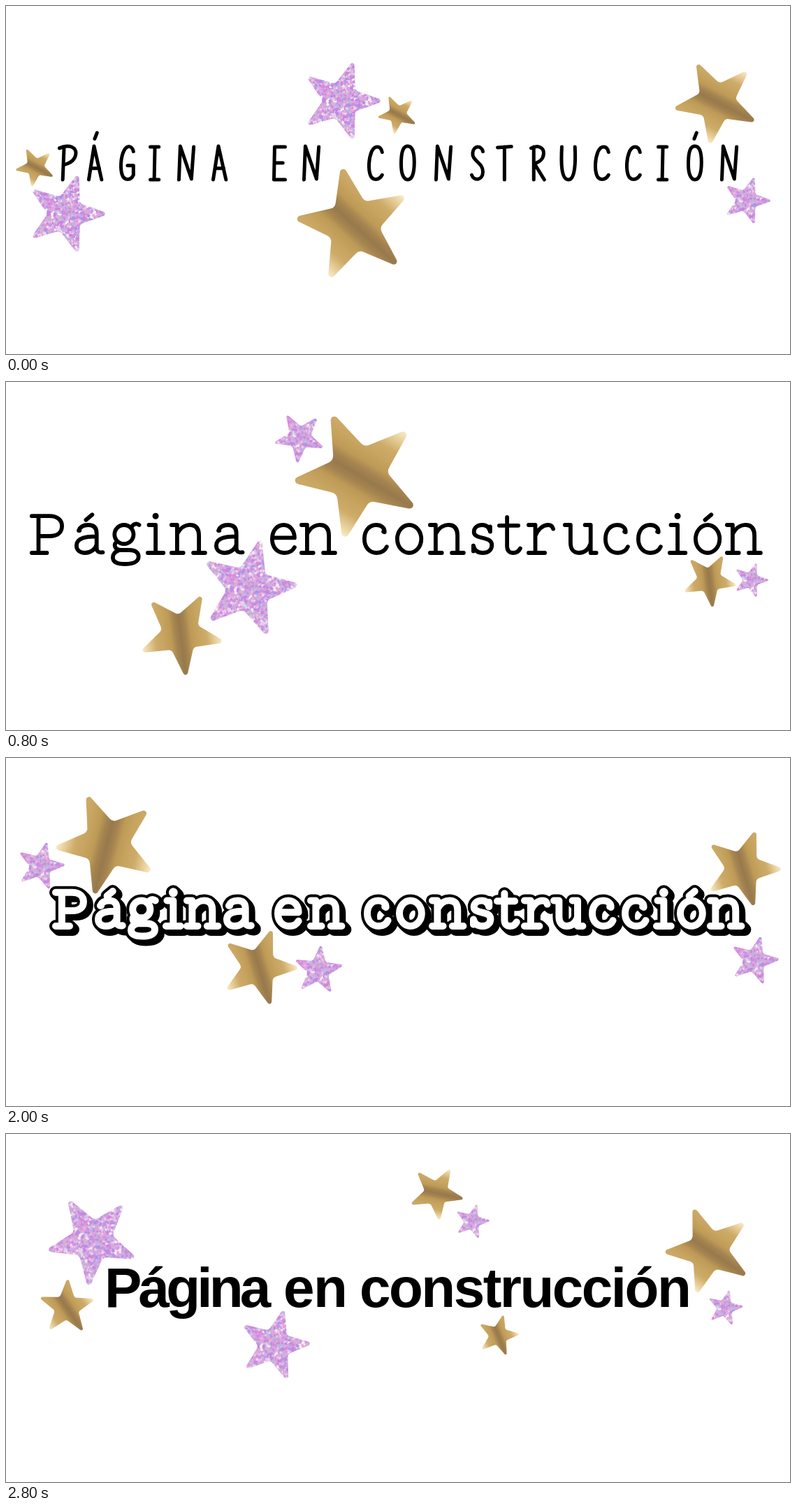
Write an HTML page with a canvas that moves like this. It is 1122 px wide and 499 px high and loops after 3.2 s.

```html
<!DOCTYPE html>
<html lang="es">
<head>
<meta charset="utf-8">
<title>Página en construcción</title>
<style>
html, body { margin: 0; width: 100%; height: 100%; overflow: hidden; background: #fff; }
canvas { display: block; }
</style>
</head>
<body>
<canvas id="stage" width="1122" height="499" role="img" aria-label="Página en construcción"></canvas>
<script>
const ctx = document.getElementById('stage').getContext('2d');
const HOLD = 400;
const PHRASE = 'Página en construcción';
const ACUTE = '\u0301';

// Pen strokes: baseline at 0, cap height 100
const hand = {
  P: 'M14 -96L10 0M0 -94C30 -108 51 -96 50 -78C48 -58 30 -48 12 -44',
  A: 'M0 0L16 -100L39 0M7 -34H32',
  G: 'M38 -84C34 -102 20 -104 10 -88C-2 -66 -2 -30 4 -14C10 2 30 4 38 -14V-42H20',
  I: 'M0 -98H26M14 -98L12 0M0 0H26',
  N: 'M0 0L4 -100L38 -2L45 -98',
  E: 'M34 -98H2L0 0H34M1 -50H27',
  C: 'M40 -82C36 -102 18 -104 8 -84C-2 -60 -2 -30 4 -14C10 2 30 4 40 -14',
  O: 'M18 -100C2 -98 0 -70 0 -46C0 -16 8 0 20 0C34 0 40 -22 40 -52C40 -82 34 -102 18 -100Z',
  S: 'M34 -84C30 -102 6 -104 3 -80C0 -56 34 -52 34 -24C34 4 6 4 0 -14',
  T: 'M0 -96L42 -99M21 -98V0',
  R: 'M8 -98V0M0 -94C24 -106 40 -94 38 -76C36 -58 24 -52 10 -48L40 0',
  U: 'M2 -98C0 -60 -2 0 22 0C44 0 44 -60 42 -98',
  [ACUTE]: 'M18 -122L25 -140'
};

// Pen strokes: baseline at 0, x-height 100
const slab = {
  P: 'M0 -132H64C92 -132 108 -117 108 -96C108 -73 92 -60 64 -60H24M24 -132V0M0 0H54',
  a: 'M8 -80C14 -96 28 -100 42 -100C64 -100 72 -88 72 -70V-18C72 -4 80 0 94 -2' +
     'M72 -58C40 -60 0 -56 0 -26C0 -8 14 0 30 0C52 0 68 -14 72 -30M8 -80h3',
  g: 'M6 -66A34 34 0 1 0 74 -66A34 34 0 1 0 6 -66M16 -42C0 -30 6 -12 28 -10H60' +
     'C84 -10 92 2 92 14C92 34 68 40 44 40C16 40 0 32 0 16C0 2 12 -6 24 -10M66 -90C72 -104 84 -108 94 -100',
  i: 'M4 -100H28V0M0 0H56M24 -132a4 4 0 1 0 8 0a4 4 0 1 0 -8 0',
  n: 'M0 -100H20V0M0 0H42M20 -68C34 -94 54 -102 70 -100C92 -98 98 -82 98 -62V0M78 0H120',
  e: 'M2 -54H80C80 -80 64 -100 41 -100C16 -100 0 -78 0 -50C0 -20 18 0 44 0C62 0 74 -8 80 -20',
  c: 'M72 -74C73 -90 60 -100 42 -100C16 -100 0 -78 0 -50C0 -20 18 0 44 0C62 0 74 -8 80 -22M68 -76h4',
  o: 'M0 -50A43 50 0 1 0 86 -50A43 50 0 1 0 0 -50',
  s: 'M60 -76V-94M60 -76C56 -92 46 -100 32 -100C14 -100 2 -90 2 -75C2 -46 66 -62 66 -28' +
     'C66 -8 50 0 34 0C16 0 4 -8 0 -26M0 -6V-26',
  t: 'M0 -98H68M28 -128V-24C28 -6 38 0 50 0C62 0 70 -6 75 -16',
  r: 'M0 -100H24V0M0 0H58M24 -60C34 -86 52 -100 70 -100C80 -100 86 -94 88 -86',
  u: 'M0 -100H20V-36C20 -12 32 0 50 0C70 0 84 -12 92 -34M72 -100H92V0H112',
  [ACUTE]: 'M34 -118L56 -137'
};

// Block letters: bars as column, row, width, height
const block = {
  P: '0019 1031 4112 1331', A: '0118 4118 1031 1531', G: '1031 0117 1831 4111 4414 3411',
  I: '0019', N: '0019 1031 4118', E: '0117 1031 1421 1831', C: '0117 1031 1831 4111 4711',
  O: '0117 4117 1031 1831', S: '1021 3111 0113 1411 2511 3612 0711 1821', T: '0051 2118',
  R: '0019 1031 4112 1331 3411 4514', U: '0018 4018 1831'
};

function eachLetter(text, xs, draw) {
  [...text.replace(/ /g, '')].forEach((ch, i) => {
    for (const part of ch.normalize('NFD')) draw(part, xs[i]);
  });
}

function penText(font, text, xs, base, sx, sy, penW, penH = penW, colour = '#000') {
  const path = new Path2D();
  eachLetter(text, xs, (ch, x) => path.addPath(new Path2D(font[ch]),
    new DOMMatrix([sx / penW, 0, 0, sy / penH, x / penW + 0.5, base / penH])));
  ctx.save();
  ctx.scale(penW, penH);
  ctx.lineWidth = 1;
  ctx.lineCap = ctx.lineJoin = 'round';
  ctx.strokeStyle = colour;
  ctx.stroke(path);
  ctx.restore();
}

// White letters with a black rim, extruded down and to the right
function raisedText(font, text, xs, base, sx, sy, pen, rim, depth) {
  for (let d = 0; d <= depth; d++) {
    penText(font, text, xs.map(x => x - rim + d), base + d, sx, sy, pen + 2 * rim);
  }
  penText(font, text, xs, base, sx, sy, pen, pen, '#fff');
}

function blockText(text, xs, top, cell) {
  const bar = (x0, c, r, w, h) => {
    const x = Math.round(x0 + c * cell), y = Math.round(top + r * cell);
    ctx.fillRect(x, y, Math.round(x0 + (c + w) * cell) - x, Math.round(top + (r + h) * cell) - y);
  };
  ctx.fillStyle = '#000';
  eachLetter(text, xs, (ch, x) => {
    if (ch === ACUTE) {
      bar(x, 3, -3, 1, 1);
      bar(x, 2, -2, 1, 1);
    } else {
      for (const b of block[ch].split(' ')) bar(x, ...[...b].map(Number));
    }
  });
}

function typeWords(font, xs, base, gaps) {
  ctx.font = font;
  ctx.textAlign = 'left';
  ctx.fillStyle = '#000';
  PHRASE.split(' ').forEach((word, i) => {
    ctx.letterSpacing = gaps[i] + 'px';
    ctx.fillText(word, xs[i], base);
  });
  ctx.letterSpacing = '0px';
}

function centred(font) {
  ctx.font = font;
  ctx.textAlign = 'center';
  ctx.fillStyle = '#000';
  ctx.fillText(PHRASE, 562, 247);
}

function seeded(seed) {
  return () => (seed = seed * 16807 % 2147483647) / 2147483647;
}

function makeGlitter() {
  const size = 160, tile = document.createElement('canvas');
  tile.width = tile.height = size;
  const g = tile.getContext('2d'), rnd = seeded(71);
  const tints = ['#dc86dc', '#c391ee', '#a397e4', '#f3c6e6', '#f8f0f6', '#c884e0', '#e8a2da', '#bcb8d6', '#d6b4da', '#e4d2ee'];
  g.fillStyle = '#d0aae0';
  g.fillRect(0, 0, size, size);
  for (let i = 0; i < 4200; i++) {
    g.fillStyle = tints[Math.floor(rnd() * tints.length)];
    g.beginPath();
    g.ellipse(rnd() * size, rnd() * size, 1.4 + rnd() * 1.4, 1.2 + rnd(), rnd() * 3, 0, 7);
    g.fill();
  }
  return ctx.createPattern(tile, 'repeat');
}
const glitter = makeGlitter();

function starPath(r) {
  const pt = i => {
    const a = i * Math.PI / 5, d = r * (i % 2 ? 0.45 : 1.11);
    return [d * Math.cos(a), d * Math.sin(a)];
  };
  const [ax, ay] = pt(0), [bx, by] = pt(1);
  ctx.beginPath();
  ctx.moveTo((ax + bx) / 2, (ay + by) / 2);
  for (let i = 1; i <= 10; i++) ctx.arcTo(...pt(i), ...pt(i + 1), r * (i % 2 ? 0.12 : 0.057));
  ctx.closePath();
}

// The sheen runs along the tip that points at the given angle
function gold(x, y, r, deg) {
  ctx.save();
  ctx.translate(x, y);
  ctx.rotate(deg * Math.PI / 180);
  const sheen = ctx.createLinearGradient(0, -r, 0, r);
  ['#fff2d4', '#e8cf9a', '#cdab68', '#c7a460', '#bd9a56', '#a58450', '#97794c'].forEach((c, i) => {
    const at = [0, 0.1, 0.2, 0.29, 0.38, 0.44, 0.5][i];
    sheen.addColorStop(at, c);
    sheen.addColorStop(1 - at, c);
  });
  ctx.fillStyle = sheen;
  starPath(r);
  ctx.fill();
  ctx.restore();
}

function pink(x, y, r, deg = 0) {
  ctx.save();
  ctx.translate(x, y);
  ctx.rotate(deg * Math.PI / 180);
  ctx.fillStyle = glitter;
  starPath(r);
  ctx.fill();
  ctx.restore();
}

const scenes = [
  () => {
    gold(1017, 137.5, 60, 27);
    gold(560.5, 155.5, 28, 28);
    gold(42, 231, 28, 28);
    gold(498, 314, 82, 42.5);
    pink(479, 136, 57);
    pink(85, 298, 57);
    pink(1060, 279, 34);
    penText(hand, PHRASE.toUpperCase(),
      [74, 116, 162, 204, 245, 294, 381, 424, 517, 563, 613, 664, 701, 749, 792, 841, 886, 931, 974, 1022],
      249, 0.47, 0.48, 5);
  },
  () => {
    gold(360, 135.5, 69, 30.5);
    pink(453, 87.5, 46);
    gold(1060.5, 147, 47.5, 67);
    gold(74.5, 305, 47, 72);
    pink(153, 300, 34.5);
    pink(804, 349, 70, -4);
    gold(966, 380, 113, 30);
    blockText(PHRASE.toUpperCase(),
      [58, 108, 162, 213, 238, 291, 372, 417, 497, 547, 600, 652, 693, 743, 796, 851, 901, 950, 975, 1030],
      193, 7.15);
  },
  () => {
    pink(420.5, 79.5, 36, 23.5);
    gold(504, 133, 91, 30.5);
    pink(347, 296, 70, -4);
    gold(250, 360.5, 60, 83);
    gold(1006.5, 284, 38.5, 83);
    pink(1066, 284, 25);
    penText(slab, PHRASE,
      [34, 98, 150, 200, 234, 298, 378, 420, 510, 557, 604, 666, 703, 745, 797, 855, 902, 947, 984, 1029],
      245, 0.4, 0.4, 5.8);
  },
  () => {
    gold(119, 115.5, 71, 32);
    pink(219, 140.5, 34.5, -2);
    gold(714, 87, 57, 62.5);
    gold(1014, 311, 90.5, 62.5);
    pink(891.5, 337, 57, -21);
    gold(398.5, 310, 32, 32);
    pink(150, 336, 80.5, -5);
    penText(slab, PHRASE,
      [131, 183, 222, 267, 289, 342, 401, 437, 507, 548, 589, 643, 674, 703, 742, 796, 838, 878, 903, 941],
      247, 0.365, 0.54, 8.6, 3.4);
  },
  () => {
    pink(62, 300, 60);
    gold(300, 107, 67, 30);
    gold(760, 311, 90, 30);
    pink(1040, 130, 40, -4);
    gold(960, 110, 40, 72);
    centred('400 78px "Noto Serif", serif');
  },
  () => {
    gold(144.5, 123.5, 73, 104);
    pink(49.5, 155, 34.5, -3);
    gold(362, 300, 55, 73);
    pink(447, 304.5, 35, -12);
    gold(1054, 158.5, 55, 73);
    pink(1071, 290.5, 35, -3);
    raisedText(slab, PHRASE,
      [66, 127, 174, 224, 254, 311, 384, 431, 512, 558, 605, 664, 698, 737, 779, 834, 881, 926, 960, 1003],
      241, 0.37, 0.365, 10, 4, 5);
  },
  () => {
    gold(49, 150, 47, 72);
    pink(1049, 290, 50);
    gold(430, 314, 80, 30);
    pink(330, 290, 40, -4);
    gold(700, 105, 45, 30);
    centred('400 82px Lato, sans-serif');
  },
  () => {
    pink(124, 152, 64.5, 23);
    gold(87, 248.5, 39.5, 56);
    gold(616, 84.5, 38.5, 12);
    pink(667, 125.5, 25, -3);
    pink(384, 303, 51, -3);
    gold(704.5, 289, 29.5, 68);
    gold(1006, 167, 62.5, 34);
    pink(1029, 249.4, 25.5, -5);
    typeWords('bold 80px "Liberation Sans", Arial, sans-serif', [141, 397, 506], 248, [-4.8, -1.5, -2.5]);
  }
];

let shown = -1;
const start = performance.now();

function tick() {
  const i = Math.floor((performance.now() - start) / HOLD) % scenes.length;
  if (i !== shown) {
    shown = i;
    ctx.fillStyle = '#fff';
    ctx.fillRect(0, 0, 1122, 499);
    scenes[i]();
  }
  requestAnimationFrame(tick);
}
tick();
</script>
</body>
</html>
```
